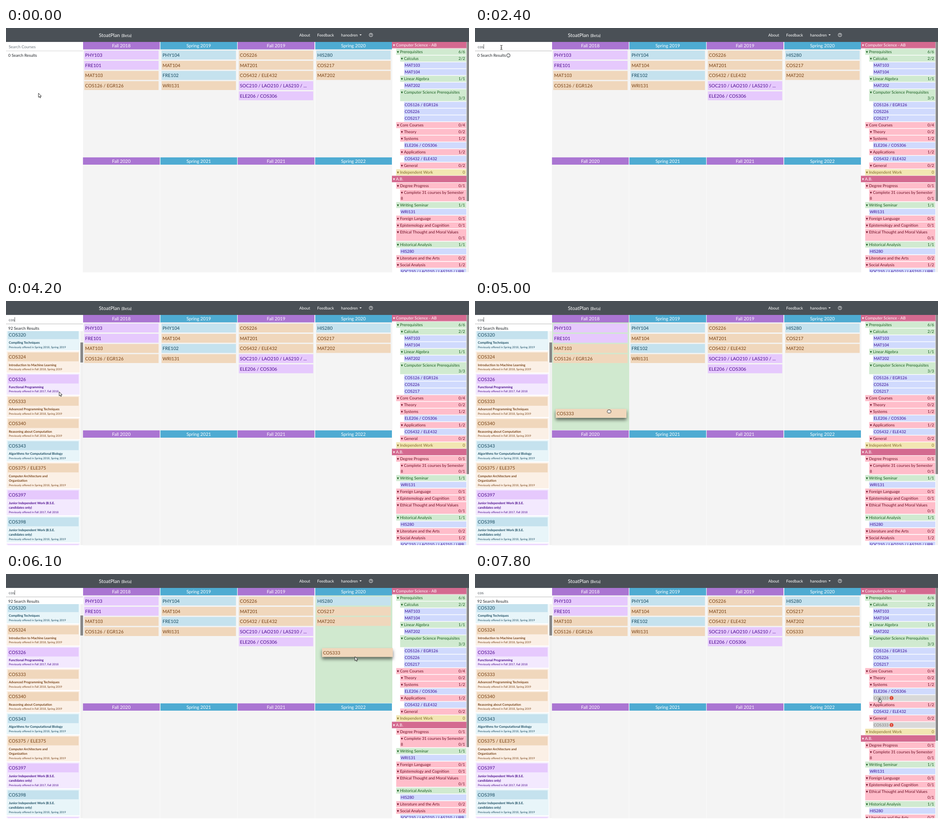
An HTML page that plays this animation: 1027x545 px, repeating every 8000 ms.

```html
<!DOCTYPE html>
<html lang="en">
<head>
<meta charset="utf-8">
<title>Course planner</title>
<style>
html, body { margin: 0; width: 100%; height: 100%; overflow: hidden; background: #fff; }
div, .abs { position: absolute; box-sizing: border-box; }
svg { position: absolute; overflow: visible; }
.anim { animation: 8s step-end -4ms infinite; }

/* Laid out large and scaled down, so edges and glyphs keep fractional places. */
#stage {
  left: 0; top: 0; width: 1027px; height: 545px; overflow: hidden;
  zoom: 4; transform: scale(.25); transform-origin: 0 0;
  font: 8.88px Lato, "Open Sans", sans-serif; color: #212529;
  white-space: nowrap; text-rendering: geometricPrecision;
}

/* top bar */
#nav { left: 0; top: 0; width: 1027px; height: 30.9px; background: #4a5056; color: #fff; line-height: 31px; }
#nav .brand { font-size: 11.1px; left: 206px; }
#nav .drop { left: 784px; top: 14.2px; border: 2.6px solid transparent; border-top-color: #fff; border-bottom: 0; }

/* search */
#search { left: 0; top: 31px; width: 170.5px; height: 20.5px; line-height: 20.5px; border-bottom: 1px solid #d2d2d2; animation-name: focus; }
#search .abs { left: 6px; }
#search .hint { color: #6c757d; animation-name: hint; }
#search .typed { color: #495057; }
.k1 { animation-name: key1; } .k2 { animation-name: key2; } .k3 { animation-name: key3; }
#caret { left: 6px; top: 5px; width: .7px; height: 10.5px; background: #333; animation-name: caret, caretMove; }
.count { left: 5px; top: 55px; line-height: 12px; }
.before { animation-name: before; }
.after { animation-name: after; }
#spin { left: 69.5px; top: 56.5px; animation-name: wait, spin; }

/* course colours */
.p { background: #e6c9fd; color: #4b0a8c; }
.o { background: #f0d7bc; color: #774114; }
.b { background: #c5e2ee; color: #17495f; }
.item.p { background: #f3e9fe; } .item.o { background: #fbf0e6; } .item.b { background: #e8f5f9; }

/* result list */
#list { left: 0; top: 67px; width: 171px; height: 476px; overflow: hidden; }
#scroll { left: 0; top: 0; animation-name: scroll; }
.item { left: 1.5px; width: 162px; }
.code { left: 2.4px; top: 2.4px; width: 157px; height: 19.8px; padding-left: 2.2px; line-height: 19.8px; font-size: 10.2px; }
.name { left: 4.8px; top: 24.7px; font-weight: bold; font-size: 7.1px; line-height: 10.6px; }
.offer { left: 4.8px; font-size: 6.2px; line-height: 10px; }
.hover { left: 2.4px; top: 2.4px; width: 157px; height: 19.8px; box-shadow: 0 1px 3px rgba(0,0,0,.5); }
.hover svg { left: 133px; top: 26px; }
.h326 { animation-name: hover326; }
.h333 { animation-name: hover333; }
.track { background: #f1f1f1; }
.thumb { background: #888; }
#listThumb { left: 165px; top: 24px; width: 6px; height: 44.5px; animation-name: listThumb; }

/* semesters */
.head { width: 170.5px; height: 16.4px; line-height: 16.4px; font-size: 10.2px; text-align: center; color: #fff; }
.fall { background: #aa75d2; } .spring { background: #4eabd2; }
.term { width: 170.5px; height: 239.4px; background: #f4f4f4; }
.t0 { animation-name: term0; } .t3 { animation-name: term3; }
.course { width: 165px; height: 19.8px; padding-left: 2.2px; line-height: 19.8px; font-size: 10.2px; }
.placed { animation-name: placed; }
#drag { left: 0; top: 0; width: 157px; box-shadow: 0 5px 7px rgba(0,0,0,.55); animation-name: dragShow, dragMove; }

/* requirements */
#reqs { left: 856px; top: 30.9px; width: 166px; height: 512.1px; padding: .4px .9px 0 .6px; overflow: hidden; }
.row { position: relative; height: 13.4px; margin-bottom: 1.6px; padding-left: 1.2px; line-height: 13.2px; overflow: hidden; }
.row.two { height: 26.4px; }
.row i { display: inline-block; width: 4.8px; height: 4.7px; margin: 0 2.1px 0 .4px; background: currentColor; clip-path: polygon(0 0, 100% 0, 50% 100%); }
.row b { position: absolute; right: 3px; bottom: 0; font-weight: normal; }
.major { background: #d46a90; color: #fff; box-shadow: 0 0 0 .6px #d46a90; }
.done { background: #d0ead0; color: #155d1c; }
.todo { background: #ffbdca; color: #6c0d24; }
.soft { background: #f2e6b2; color: #806a2a; }
.leaf { background: #d0dafd; color: #3a0a92; }
.late { background: #d9d9d9; color: #777; animation-name: late; }
.late u {
  display: inline-block; width: 8.8px; height: 8.8px; margin-left: 2px; overflow: hidden; vertical-align: -1.2px;
  border-radius: 50%; background: #dc4a38; color: #fff; font-weight: bold; font-size: 7.5px; line-height: 8.8px;
  text-align: center; text-decoration: none;
}
#reqThumb { left: 1021.8px; top: 31px; width: 5.2px; height: 354px; animation-name: reqThumb; }

/* pointer */
#pointer { left: 0; top: 0; animation-name: pointer; }
.arrow { animation-name: arrow; } .beam { animation-name: beam; }
.fist { animation-name: fist; } .hand { animation-name: hand; }

@keyframes focus { 0% { border-color: #d2d2d2 } 10% { border-color: #c6c6c6 } 11.25% { border-color: #b8b8b8 } }
@keyframes hint { 0% { opacity: 1 } 20% { opacity: 0 } }
@keyframes key1 { 0% { opacity: 0 } 20% { opacity: 1 } }
@keyframes key2 { 0% { opacity: 0 } 22.5% { opacity: 1 } }
@keyframes key3 { 0% { opacity: 0 } 25% { opacity: 1 } }
@keyframes caret { 0%, 17.5%, 47.5%, 97.5% { opacity: 0 } 10%, 20%, 52.5% { opacity: 1 } }
@keyframes caretMove { 0% { left: 6px } 20% { left: 10.2px } 22.5% { left: 15.3px } 25% { left: 19.1px } }
@keyframes before { 0% { opacity: 1 } 47.5% { opacity: 0 } }
@keyframes after { 0% { opacity: 0 } 47.5% { opacity: 1 } }
@keyframes wait { 0%, 47.5% { opacity: 0 } 25% { opacity: 1 } }
@keyframes spin { 0% { transform: rotate(0) } 26.25% { transform: rotate(36deg) } 27.5% { transform: rotate(72deg) } 28.75% { transform: rotate(108deg) } 30% { transform: rotate(144deg) } }
@keyframes scroll { 0% { transform: none } 50% { transform: translateY(-14px) } }
@keyframes listThumb { 0% { top: 24px } 50% { top: 25.3px } }
@keyframes hover326 { 0%, 52.5% { opacity: 0 } 50% { opacity: 1 } }
@keyframes hover333 { 0%, 50%, 58.75% { opacity: 0 } 47.5%, 56.25% { opacity: 1 } }
@keyframes term0 { 0%, 67.5% { background: #f4f4f4 } 62.5% { background: #d0e9cf } }
@keyframes term3 { 0%, 82.5% { background: #f4f4f4 } 67.5% { background: #d0e9cf } }
@keyframes placed { 0% { opacity: 0 } 82.5% { opacity: 1 } }
@keyframes dragShow { 0%, 82.5% { opacity: 0 } 58.75% { opacity: 1 } }
@keyframes dragMove {
  0% { transform: translate(4px, 213.3px) } 62.5% { transform: translate(179px, 240px) }
  67.5% { transform: translate(624px, 246px) } 70% { transform: translate(688px, 205px) }
  73.75% { transform: translate(705px, 180px) } 76.25% { transform: translate(701px, 164.8px) }
  80% { transform: translate(688px, 118.3px) }
}
@keyframes late { 0% { height: 0; margin-bottom: 0 } 91.25% { height: 13.4px; margin-bottom: 1.6px } }
@keyframes reqThumb { 0% { height: 354px } 91.25% { height: 340px } }
@keyframes pointer {
  0% { transform: translate(72px, 145px) } 1.25% { transform: translate(71.5px, 138px) }
  2.5% { transform: translate(70px, 118px) } 3.75% { transform: translate(66px, 88px) }
  5% { transform: translate(61px, 60px) } 6.25% { transform: translate(58.5px, 43.3px) }
  47.5% { transform: translate(76px, 252.5px) } 50% { transform: translate(96px, 190px) }
  52.5% { transform: translate(118px, 202px) } 56.25% { transform: translate(122px, 218px) }
  62.5% { transform: translate(297.5px, 245.5px) } 67.5% { transform: translate(742px, 251px) }
  70% { transform: translate(806px, 210px) } 73.75% { transform: translate(823px, 185px) }
  76.25% { transform: translate(774px, 183.7px) } 80% { transform: translate(780px, 203px) }
  82.5% { transform: translate(787.3px, 240px) } 91.25% { transform: translate(886.5px, 276px) }
  93.75% { transform: translate(897.3px, 276.3px) }
}
@keyframes arrow { 0%, 52.5%, 76.25% { opacity: 1 } 6.25%, 56.25%, 93.75% { opacity: 0 } }
@keyframes beam { 0%, 52.5% { opacity: 0 } 6.25% { opacity: 1 } }
@keyframes fist { 0%, 76.25% { opacity: 0 } 56.25% { opacity: 1 } }
@keyframes hand { 0% { opacity: 0 } 93.75% { opacity: 1 } }
</style>
</head>
<body>
<div id="stage">
<div id="nav">
  <span class="abs brand">StoatPlan</span><span class="abs" style="left:256px;top:.7px">(Beta)</span>
  <span class="abs" style="left:650.5px">About</span>
  <span class="abs" style="left:690.3px">Feedback</span>
  <span class="abs" style="left:743.3px">hanodren</span><div class="drop"></div>
  <svg style="left:805px;top:11px" width="9" height="9" fill="none" stroke="#fff"><circle cx="4.5" cy="4.5" r="3.9" stroke-width=".9"/><path d="M3.2 3.6Q3.3 2.4 4.5 2.4T5.8 3.6Q5.8 4.3 4.6 4.7V5.3M4.6 6.1V6.9" stroke-width=".9"/></svg>
</div>

<div id="search" class="anim">
  <span class="abs hint anim">Search Courses</span>
  <span class="abs typed"><span class="k1 anim">c</span><span class="k2 anim">o</span><span class="k3 anim">s</span></span>
  <div id="caret" class="anim"></div>
</div>
<div class="count before anim">0 Search Results</div>
<div class="count after anim">92 Search Results</div>
<svg id="spin" class="anim" width="9" height="9"><circle cx="4.5" cy="4.5" r="3.7" fill="none" stroke="#212529" stroke-width="1.15" stroke-dasharray="22 1.25"/></svg>

<div id="list" class="after anim">
  <div id="scroll" class="anim"></div>
  <div class="track" style="left:165px;top:0;width:6px;height:476px"></div>
  <div id="listThumb" class="thumb anim"></div>
</div>

<div id="plan" style="left:0;top:0"></div>
<div id="reqs"></div>
<div class="track" style="left:1021.8px;top:31px;width:5.2px;height:512px"></div>
<div id="reqThumb" class="thumb anim"></div>
<div id="drag" class="course o anim">COS333</div>

<div id="pointer" class="anim">
  <svg class="arrow anim" width="9" height="12"><path d="M0 0V9.2L2.1 7.3 3.5 10.5 5 9.8 3.7 6.8H6.5Z" fill="#fff" stroke="#111" stroke-width=".9"/></svg>
  <svg class="beam anim" width="6" height="10"><path d="M-2.4-4.6Q-.4-4.8 0-4 .4-4.8 2.4-4.6M0-4V4M-2.4 4.6Q-.4 4.8 0 4 .4 4.8 2.4 4.6M-1.2 .8H1.2" fill="none" stroke="#111" stroke-width="1"/></svg>
  <svg class="fist anim" width="10" height="8"><path d="M-3.6-.6Q-4-2.6-2.2-3 0-4 2-3 4-2.8 4 0V1.4Q3.6 3.4 2.4 3.6H-2.2Q-4.2 2.2-4.4.8-4.4-.4-3.6-.6Z" fill="#fff" stroke="#111" stroke-width="1"/></svg>
  <svg class="hand anim" width="9" height="11"><path d="M-.9.6Q0-.4.8.6V3.6L3.6 4.2Q4.6 4.6 4.4 6L3.8 9.4H-1.2L-3.2 6.2Q-3.2 5-2 5.4L-.9 6.2Z" fill="#fff" stroke="#111" stroke-width=".9"/></svg>
</div>
</div>

<script>
const add = (parent, cls, html = '', style = '') => {
  const el = document.createElement('div');
  el.className = cls;
  el.innerHTML = html;
  el.style.cssText = style;
  return parent.appendChild(el);
};
const byId = id => document.getElementById(id);

// Semester grid: the first letter of each course is its colour.
const terms = [
  'Fall 2018|pPHY103|pFRE101|oMAT103|oCOS126 / EGR126',
  'Spring 2019|bPHY104|oMAT104|bFRE102|oWRI131',
  'Fall 2019|oCOS226|oMAT201|oCOS432 / ELE432|pSOC210 / LAO210 / LAS210 / ...|pELE206 / COS306',
  'Spring 2020|bHIS280|oCOS217|oMAT202|oCOS333',
  'Fall 2020', 'Spring 2021', 'Fall 2021', 'Spring 2022'
];
terms.forEach((term, i) => {
  const [title, ...courses] = term.split('|');
  const x = 170.6 + 171.6 * (i % 4), y = i < 4 ? 31 : 287.6;
  const plan = byId('plan');
  add(plan, `term t${i} anim`, '', `left:${x}px;top:${y + 16.2}px`);
  add(plan, 'head ' + (i % 2 ? 'spring' : 'fall'), title, `left:${x}px;top:${y}px`);
  courses.forEach((c, n) => add(plan, `course ${c[0]}${c === 'oCOS333' ? ' placed anim' : ''}`, c.slice(1),
    `left:${x + 2.8}px;top:${50.2 + 22.7 * n}px`));
});

// Search results
const icons = `<svg width="26" height="10"><circle cx="5" cy="5.2" r="4.7" fill="#2a7cf0"/>
  <path d="M5 2.2V3.5M4.2 4.7H5.1V7.6M4 7.7H6.2" stroke="#fff" stroke-width="1.2" fill="none"/>
  <path d="M12.6 1V9H22.4M14.9 5V7.7M17 3V7.7M19 4.2V7.7M21 2V7.7" stroke="#2a7cf0" stroke-width="1.2" fill="none"/></svg>`;
const fall = 'Fall 2017, Fall 2018', spring = 'Spring 2018, Spring 2019', mixed = 'Fall 2018, Spring 2019';
const junior = 'Junior Independent Work (B.S.E.<br>candidates only)';
const results = [
  ['p', 'COS318', 'Operating Systems', fall],
  ['b', 'COS320', 'Compiling Techniques', spring],
  ['o', 'COS324', 'Introduction to Machine Learning', mixed],
  ['p', 'COS326', 'Functional Programming', fall],
  ['o', 'COS333', 'Advanced Programming Techniques', mixed],
  ['o', 'COS340', 'Reasoning about Computation', mixed],
  ['b', 'COS343', 'Algorithms for Computational Biology', spring],
  ['o', 'COS375 / ELE375', 'Computer Architecture and<br>Organization', spring],
  ['p', 'COS397', junior, fall],
  ['b', 'COS398', junior, spring],
  ['p', 'COS401', 'Introduction to Machine Translation', fall]
];
let itemTop = -39.8;
results.forEach(([tone, code, name, when]) => {
  const extra = name.includes('<br>') ? 10.6 : 0;
  const item = add(byId('scroll'), 'item ' + tone, '', `top:${itemTop}px;height:${47.2 + extra}px`);
  add(item, 'code ' + tone, code);
  add(item, 'name', name);
  add(item, 'offer', 'Previously offered in ' + when, `top:${34.8 + extra}px`);
  if (code === 'COS326' || code === 'COS333') add(item, `hover h${code.slice(3)} anim`, icons);
  itemTop += 49.4 + extra;
});

// Requirements: depth, kind, label, count
const reqs = `0 major Computer Science - AB
1 done Prerequisites;6/6
2 done Calculus;2/2
3 leaf MAT103
3 leaf MAT104
2 done Linear Algebra;1/1
3 leaf MAT202
2 done Computer Science Prerequisites<br>;3/3
3 leaf COS126 / EGR126
3 leaf COS226
3 leaf COS217
1 todo Core Courses;0/4
2 todo Theory;0/2
2 todo Systems;1/2
3 leaf ELE206 / COS306
3 late COS333
2 todo Applications;1/2
3 leaf COS432 / ELE432
2 todo General;0/2
3 late COS333
1 soft Independent Work;0
0 major A.B.
1 todo Degree Progress;0/1
2 todo Complete 31 courses by Semester<br>8;0/1
1 done Writing Seminar;1/1
2 leaf WRI131
1 todo Foreign Language;0/1
1 todo Epistemology and Cognition;0/1
1 todo Ethical Thought and Moral Values<br>;0/1
1 done Historical Analysis;1/1
2 leaf HIS280
1 todo Literature and the Arts;0/2
1 todo Social Analysis;1/2
2 leaf SOC210 / LAO210 / LAS210 / URB`;
reqs.split('\n').forEach(line => {
  const [, depth, kind, label, count] = line.match(/^(\d) (\w+) ([^;]+);?(.*)$/);
  const open = /leaf|late/.test(kind) ? '' : '<i></i>';
  const mark = kind === 'late' ? '<u>!</u>' : '';
  const cls = `row ${kind}${label.includes('<br>') ? ' two' : ''}${mark && ' anim'}`;
  add(byId('reqs'), cls, `${open}${label}${mark}<b>${count}</b>`, `margin-left:${8.8 * depth}px`);
});
</script>
</body>
</html>
```
